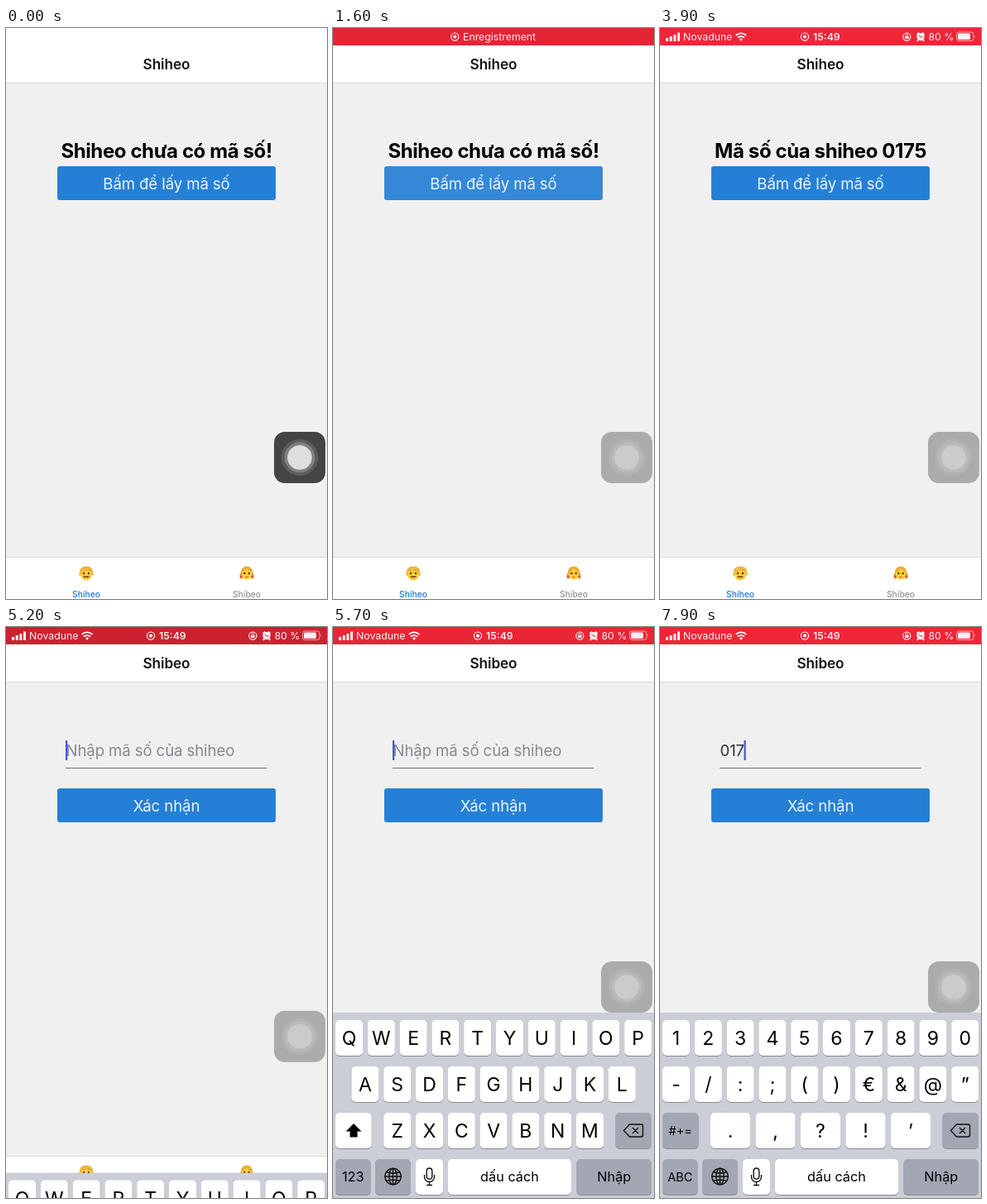
An HTML page that plays this animation: 388 by 690 pixels, repeating every 8 s.

```html
<!DOCTYPE html>
<html lang="vi">
<head>
<meta charset="utf-8">
<title>Mã số</title>
<style>
html, body { margin: 0; width: 100%; height: 100%; overflow: hidden; background: #fff; }
svg { display: block; width: 388px; height: 690px; }
text { font-family: Inter, "Noto Sans", sans-serif; }
.mid { text-anchor: middle; }
.title { font-size: 17.2px; font-weight: 600; fill: #141414; letter-spacing: -.1px; }
.head { font-size: 24px; font-weight: 700; letter-spacing: -.4px; }
.btn { font-size: 18.6px; fill: #eaf4ff; letter-spacing: -.1px; }
.field { font-size: 18.6px; letter-spacing: -.1px; }
.tab { font-size: 10.3px; font-weight: 500; }
.status text { font-size: 12.3px; }
.key { font-size: 23px; }
.word { font-size: 16.3px; }
.small { font-size: 14.5px; }
</style>
</head>
<body>
<svg viewBox="0 0 388 690">
  <rect width="388" height="690" fill="#fff"/>
  <rect y="66" width="388" height="574" fill="#f0f0f0"/>
  <path d="M0 66.5H388M0 639.5H388" stroke="#d9d9db"/>

  <g id="bar"><rect id="red" width="388" height="21"/>
    <g class="status" fill="#fff" fill-opacity=".93">
      <g id="recording">
        <circle cx="147.3" cy="10.6" r="4.6" fill="none" stroke="#fff" stroke-width="1.1"/>
        <circle cx="147.3" cy="10.6" r="2.1"/>
        <text x="157" y="15">Enregistrement</text>
      </g>
      <g id="phone">
        <path d="M7 12h3v4H7zM11.7 10h3v6h-3zM16.4 8h3v8h-3zM21 5.500h3V16h-3z"/>
        <text x="28" y="15">Novadune</text>
        <g fill="none" stroke="#fff" stroke-width="1.8">
          <path d="M91.700 9a9 9 0 0 1 12.600 0M94 11.700a5.700 5.700 0 0 1 8 0"/>
          <circle cx="175" cy="10.600" r="4.600" stroke-width="1.100"/>
          <circle cx="298.300" cy="10.600" r="4.600" stroke-width="1.100"/>
          <path d="M296.900 10V9a1.400 1.400 0 0 1 2.800 0v1" stroke-width=".8"/>
        </g>
        <path d="M96 13.500a3 3 0 0 1 4 0L98 16zM296 10h4.600v3H296z"/>
        <circle cx="175" cy="10.600" r="2.100"/>
        <text x="185" y="15" font-weight="600">15:49</text>
        <circle cx="315" cy="10.600" r="4.700"/>
        <path d="M310.500 8l2.500-2.500M319.500 8L317 5.500M312 14l-1 2M318 14l1 2" stroke="#fff" stroke-width="1.700"/>
        <path d="M312.500 8.700l2.500 2.300h2.500" fill="none" stroke="#d92735"/>
        <text x="324.500" y="15">80 %</text>
        <rect x="358.500" y="5" width="20.500" height="10.500" rx="2.800" fill="none" stroke="#fff" stroke-opacity=".6"/>
        <rect x="360" y="6.500" width="15" height="7.500" rx="1.500"/>
        <path d="M380.300 8.500q1.700 1.700 0 3.500z" fill-opacity=".6"/>
      </g>
    </g>
  </g>

  <text id="title" class="mid title" x="194" y="49.500"></text>

  <g id="codePage">
    <text id="head" class="mid head" x="194" y="156.500"></text>
    <g id="getCode"><rect x="62" y="167" width="264" height="41" rx="3" fill="#2580d5"/>
      <text class="mid btn" x="194" y="194.500">Bấm để lấy mã số</text></g>
  </g>
  <g id="entryPage">
    <text id="field" class="field" x="72.500" y="156"></text>
    <path d="M72 170.500H315.500" stroke="#77717f"/>
    <rect id="caret" y="137" width="2.200" height="24" fill="#4358d6"/>
    <rect x="62" y="195" width="264" height="41" rx="3" fill="#2580d5"/>
    <text class="mid btn" x="194" y="222.500">Xác nhận</text>
  </g>

  <g transform="translate(97 659)">
    <path d="M-8 0Q-9-8 0-8.500Q9-8 8 0L6 3H-6z" fill="#dda026"/>
    <circle cx="-7.300" cy="1" r="1.700" fill="#f5b82d"/><circle cx="7.300" cy="1" r="1.700" fill="#f5b82d"/>
    <path d="M-6.700-2Q0-5 6.700-2V2Q6 8.500 0 8.500T-6.700 2z" fill="#ffcd3c"/>
    <path d="M-7-2Q-1-2 3-5Q4-3 7-2Q8-8 0-8T-7-2" fill="#efb63a"/>
    <circle cx="-3" cy="0" r="1.200" fill="#49311d"/><circle cx="3" cy="0" r="1.200" fill="#49311d"/>
    <path d="M-4 4Q-2 2.500 0 3.500Q2 2.500 4 4Q2 6 0 5Q-2 6-4 4" fill="#8b4f1f"/>
  </g>
  <g transform="translate(291 659)">
    <path d="M-6-2Q-10 1-7.500 7L-4 5M6-2Q10 1 7.500 7L4 5" fill="#d99a22"/>
    <path d="M-7 1Q-8-8 0-8.500Q8-8 7 1z" fill="#e9ac2c"/>
    <path d="M-6-1Q-2-3 0-6Q2-3 6-1V2Q5 7.500 0 7.500T-6 2z" fill="#ffcd3c"/>
    <circle cx="-2.700" cy="0" r="1.200" fill="#49311d"/><circle cx="2.700" cy="0" r="1.200" fill="#49311d"/>
    <path d="M-2 4Q0 6 2 4z" fill="#a94123"/>
    <circle cx="-7" cy="4" r="1.300" fill="#e5433c"/><circle cx="7" cy="4" r="1.300" fill="#e5433c"/>
  </g>
  <text id="tabA" class="mid tab" x="97" y="687.500">Shiheo</text>
  <text id="tabB" class="mid tab" x="291" y="687.500">Shibeo</text>

  <g id="keyboard">
    <rect y="466" width="388" height="224" fill="#cbced6"/>
    <g id="letters"></g><g id="numbers"></g><g id="common"></g>
  </g>
  <g id="touch">
    <rect x="324" y="488" width="62" height="62" rx="13"/>
    <circle cx="355" cy="519" r="22.300"/>
    <circle cx="355" cy="519" r="18.500"/>
    <circle cx="355" cy="519" r="14.800"/>
  </g>
</svg>
<script>
const $ = id => document.getElementById(id);
const show = (id, on) => $(id).style.display = on ? '' : 'none';
const clamp = v => Math.min(1, Math.max(0, v));
const ramp = (t, from, to) => clamp((t - from) / (to - from));
const mix = (a, b, p) => `rgb(${a.map((v, i) => Math.round(v + (b[i] - v) * p))})`;
const easeOut = p => 1 - (1 - p) ** 3;

const LOOP = 8000, PITCH = 38.8, ROWS = [475, 531, 587, 643];
const WHITE = '#fff', GRAY = '#a2a7b3';
const T = { bar: 100, fade: 250, press: 1585, code: 1800, phone: 2900, tab: 4400, focus: 5120, slide: 5182, numbers: 6300 };
const TYPED = [[7600, '017'], [7150, '01'], [6750, '0']];
const SHADES = [[68, 171], [91, 178], [128, 186], [222, 203]];

function key(x, row, w, label, fill = WHITE, cls = 'key') {
  const y = ROWS[row], base = { key: 30, word: 27, small: 26.5 }[cls];
  return `<rect x="${x}" y="${y + 1}" width="${w}" height="43" rx="5" fill="#898b91"/>
    <rect x="${x}" y="${y}" width="${w}" height="43" rx="5" fill="${fill}"/>
    <text class="mid ${cls}" x="${x + w / 2}" y="${y + base}">${label}</text>`;
}
const line = (chars, x, row, pitch = PITCH, w = 33) =>
  [...chars].map((c, i) => key(x + i * pitch, row, w, c.replace('&', '&amp;'))).join('');

$('letters').innerHTML = line('QWERTYUIOP', 3, 0) + line('ASDFGHJKL', 22.4, 1) + line('ZXCVBNM', 61.2, 2)
  + key(3, 2, 43.5, '') + key(3, 3, 42.5, '123', GRAY, 'word')
  + '<path d="M25 600l9.500 9.500H29.500V616.500h-9V609.500H15.500z"/>';
$('numbers').innerHTML = line('1234567890', 3, 0) + line('-/:;()€&@”', 3, 1) + line('.,?!’', 61, 2, 54.5, 48)
  + key(3, 2, 43.5, '#+=', GRAY, 'small') + key(3, 3, 42.5, 'ABC', GRAY, 'small');
$('common').innerHTML = key(341.5, 2, 43.5, '', GRAY) + key(51, 3, 43, '', GRAY) + key(100, 3, 33, '')
  + key(139, 3, 149, 'dấu cách', WHITE, 'word') + key(294.500, 3, 90.500, 'Nhập', GRAY, 'word')
  + `<g fill="none" stroke="#111" stroke-width="1.4">
    <path d="M351.500 608.500l7-7.500h14q2 0 2 2v11q0 2-2 2h-14zM362 605l7 7m0-7l-7 7"/>
    <circle cx="72.500" cy="664" r="9.800"/><ellipse cx="72.500" cy="664" rx="4.700" ry="9.800"/>
    <path d="M62.700 664h19.600M72.500 654.200v19.600M64.500 658.500q8 3 16 0M64.500 669.500q8-3 16 0"/>
    <rect x="113.200" y="654" width="6.600" height="13" rx="3.300"/>
    <path d="M110.500 662v2.500a6 6 0 0 0 12 0V662M116.500 670.500v4M113 674.500h7"/></g>`;

function draw(t) {
  const second = t >= T.tab, focused = t >= T.focus;

  $('bar').style.opacity = ramp(t, T.bar, T.bar + 300);
  const pulse = (1 - Math.cos((t - 950) / 2000 * 2 * Math.PI)) / 2;
  $('red').setAttribute('fill', mix([198, 34, 46], [240, 37, 55], pulse));
  show('recording', t < T.phone);
  show('phone', t >= T.phone);

  $('title').textContent = second ? 'Shibeo' : 'Shiheo';
  show('codePage', !second);
  show('entryPage', second);
  $('tabA').setAttribute('fill', second ? '#929292' : '#1a7bd8');
  $('tabB').setAttribute('fill', second ? '#1a7bd8' : '#929292');

  $('head').textContent = t < T.code ? 'Shiheo chưa có mã số!' : 'Mã số của shiheo 0175';
  const down = ramp(t, T.press, T.press + 165), up = ramp(t, T.code, T.code + 250);
  $('getCode').style.opacity = 1 - .8 * down * (1 - up);

  const typed = (TYPED.find(([at]) => t >= at) || [0, ''])[1];
  $('field').textContent = typed || 'Nhập mã số của shiheo';
  $('field').setAttribute('fill', typed ? '#303033' : '#85888f');
  const width = typed && second ? $('field').getComputedTextLength() : 0;
  $('caret').setAttribute('x', 72 + width);
  show('caret', focused && !(t > 5850 && t < 6200));

  show('keyboard', t >= T.slide);
  const rise = easeOut(ramp(t, T.slide, T.slide + 400));
  $('keyboard').setAttribute('transform', `translate(0 ${224 * (1 - rise)})`);
  show('letters', t < T.numbers);
  show('numbers', t >= T.numbers);

  const lift = easeOut(ramp(t, T.slide - 12, T.slide + 400));
  $('touch').setAttribute('transform', `translate(0 ${-84 * (t < T.slide ? lift : Math.min(1, lift + .1 * (1 - lift)))})`);
  const dim = ramp(t, T.fade, T.fade + 350);
  [...$('touch').children].forEach((el, i) => {
    const [a, b] = SHADES[i];
    el.setAttribute('fill', mix([a, a, a], [b, b, b], dim));
  });
}

const start = performance.now();
function tick() {
  draw((performance.now() - start) % LOOP);
  requestAnimationFrame(tick);
}
draw(0);
tick();
</script>
</body>
</html>
```
